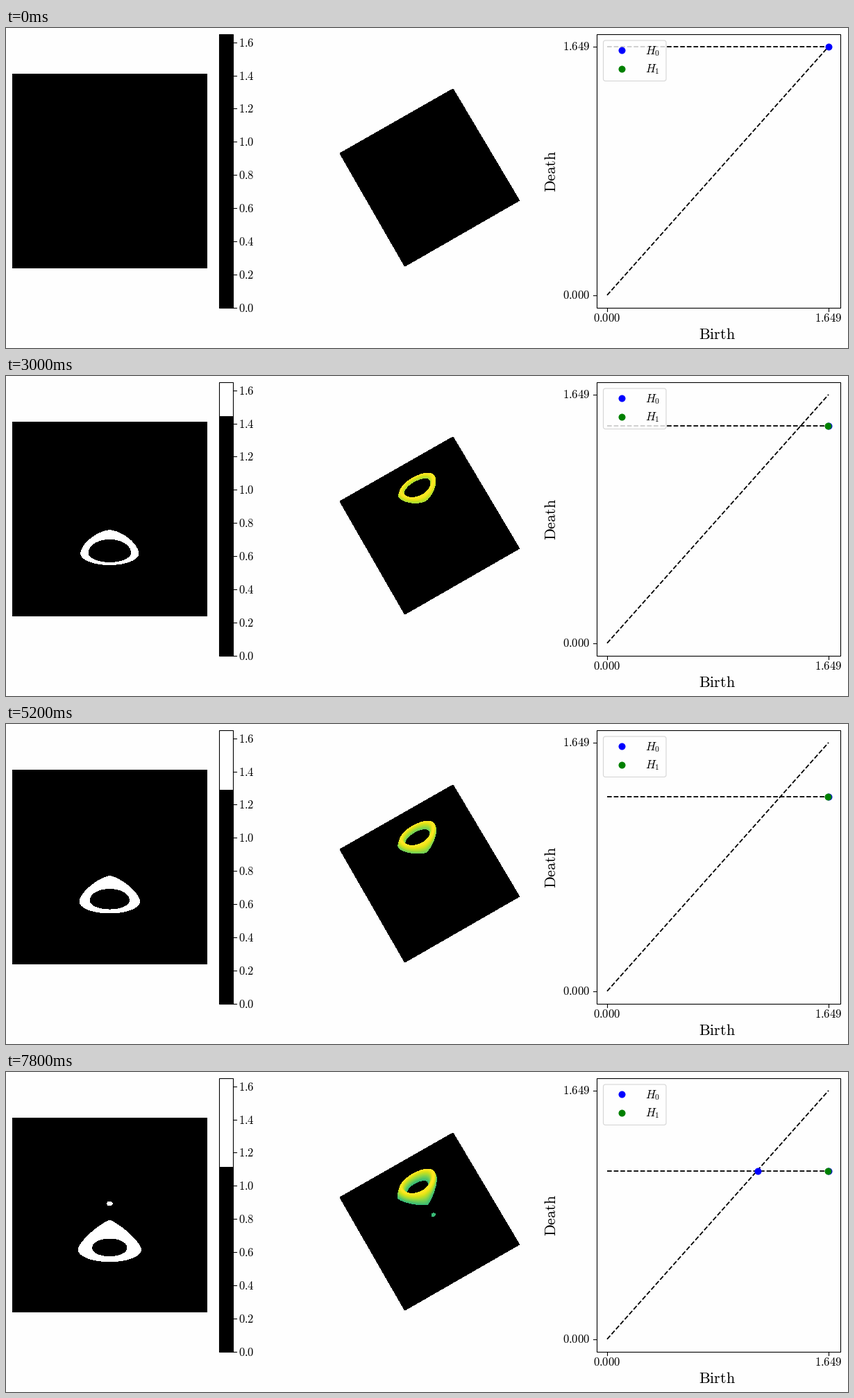
Recreate the animation shown at these times as a matplotlib script. Size 1213 px wide and 462 px high, loop 8000 ms.

```python
import numpy as np
import matplotlib.pyplot as plt
from matplotlib.animation import FuncAnimation
from matplotlib.patches import FancyBboxPatch, Polygon, Rectangle

W, H, DPI = 1213, 462, 100
FRAMES, STEPS = 40, 120
PEAK = 1.649          # highest value of the field
SPECK = 1.1217        # height of the second, smaller peak
PT = 72 / DPI

plt.rcParams["mathtext.fontset"] = "cm"
fig = plt.figure(figsize=(W / DPI, H / DPI), dpi=DPI, facecolor="#fefefe")
ax = fig.add_axes([0, 0, 1, 1])
ax.axis("off")

# Shape of the level curves, by signed offset from the ridge (inside > 0)
LEVEL = [-0.732, -0.6, -0.389, 0, 0.389, 0.6, 0.732]
HALF = [45.1, 43.2, 40.7, 36, 31, 28, 24.6]
TOP = [214, 219.5, 224.2, 230, 235.5, 238.6, 241]
BOTTOM = [273.7, 273, 272.2, 271, 269, 267, 265.6]
WAIST = [256, 256, 256, 256, 255.5, 254.5, 254]
POWER = [1.15, 1.35, 1.65, 1.9, 2, 2, 2]
ROUND = [0.72, 0.66, 0.6, 0.55, 0.52, 0.5, 0.5]
CX = 149.3
THETA = np.linspace(0, 2 * np.pi, 900)


def contour(c):
    """Points of the level curve (or curves) at offset c, in stage pixels."""
    half, top, bottom, waist, p, m = (
        np.interp(c, LEVEL, v) for v in (HALF, TOP, BOTTOM, WAIST, POWER, ROUND))
    cos, sin = np.cos(THETA), np.sin(THETA)
    rise = np.clip(1 - np.abs(cos) ** p, 0, 1) ** m
    y = np.where(sin > 0, waist - (waist - top) * rise,
                 waist - (bottom - waist) * sin)
    return CX + half * cos, y


def project(x, y, z):
    """Tilted 3D view of the left panel; also returns the depth order."""
    right, up = x - CX, 206.5 - y
    scale = 1 + 0.045 * z
    base = 0.573 * up + 0.331 * right
    px = 609.8 + scale * (0.338 * up - 0.58 * right)
    return px, 215.7 + scale * base - 17.5 * z, base


def text(x, y, s, size=12, **kw):
    ax.text(x, y, s, fontsize=size, color="black", **kw)


def line(xs, ys, width=0.8, **kw):
    return ax.plot(xs, ys, color="black", lw=width, **kw)[0]


def dot(x, y, color, z):
    return ax.plot([x], [y], "o", color=color, ms=10 * PT, mew=0, zorder=z)[0]


def box(x0, y0, x1, y1, **kw):
    return ax.add_patch(Rectangle((x0, y0), x1 - x0, y1 - y0, **kw))


# Left panel: thresholded image
box(9, 66, 290, 347, fc="black", lw=0, aa=False)
outer = ax.add_patch(Polygon([(0, 0)] * 3, fc="white", lw=0, aa=False, zorder=2))
inner = ax.add_patch(Polygon([(0, 0)] * 3, fc="black", lw=0, aa=False, zorder=3))
speck = ax.add_patch(Polygon(
    [(CX + dx, 190 + dy) for dx, dy in
     ((-4, 0), (-1.7, -3), (1.7, -3), (4, 0), (1.7, 3), (-1.7, 3))],
    fc="white", lw=0, aa=False, zorder=2))

# Colour bar
box(307, 9, 327, 404, fc="black", lw=0)
bar = box(307, 9, 327, 9, fc="white", lw=0, aa=False, zorder=2)
box(307, 9, 327, 404, fc="none", ec="black", lw=0.8, zorder=3)
for k in range(9):
    y = 404 - 239.6 * 0.2 * k
    line([327, 332], [y, y])
    text(335, y + 6, f"${0.2 * k:.1f}$")

# Middle panel: surface seen from above
ax.add_patch(Polygon([(481, 181), (644, 88), (739.5, 249), (574.5, 344)],
                     fc="black", lw=0, aa=False))
X0, X1, Y0, Y1 = 550, 640, 125, 220
surface = ax.imshow(np.zeros((Y1 - Y0, X1 - X0, 4)), extent=(X0, X1, Y1, Y0),
                    interpolation="nearest", aspect="auto", zorder=2)

# Right panel: persistence diagram
AX0, AX1, AY0, AY1 = 866, 1185, 385.7, 26.8


def birth_x(v):
    return AX0 + (AX1 - AX0) * v / PEAK


def death_y(v):
    return AY0 + (AY1 - AY0) * v / PEAK


box(851, 9, 1202, 404, fc="none", ec="black", lw=0.8, zorder=5)
for x, y, label in ((AX0, AY0, "$0.000$"), (AX1, AY1, "$1.649$")):
    line([x, x], [404, 409])
    line([846, 851], [y, y])
    text(x, 424.5, label, ha="center")
    text(841.5, y + 5.7, label, ha="right")
text(1024.5, 449, r"$\mathrm{Birth}$", 16, ha="center")
text(786, 207, r"$\mathrm{Death}$", 16, ha="center", va="center", rotation=90)
line([AX0, AX1], [AY0, AY1], 1.3, ls="--", zorder=2)
sweep = line([AX0, AX1], [AY1, AY1], 1.3, ls="--", zorder=2)
h0 = dot(AX1, AY1, "blue", 3)
h0_new = dot(birth_x(SPECK), AY1, "blue", 3)
h1 = dot(birth_x(1.646), AY1, "green", 4)

ax.add_patch(FancyBboxPatch(
    (860.5, 18), 90.5, 58.5, boxstyle="round,pad=0,rounding_size=3",
    fc="white", ec="#cccccc", lw=0.8, alpha=0.8, zorder=6))
for y, color, label in ((32, "blue", "$H_0$"), (58.5, "green", "$H_1$")):
    dot(887, y, color, 7)
    text(921, y + 6, label, zorder=7)

ax.set_xlim(0, W)
ax.set_ylim(H, 0)


def render(t, reach, with_speck):
    """Paint the part of the surface above t, far points first."""
    xs, ys, zs = [], [], []
    for c in np.linspace(-reach, reach, 70):
        x, y = contour(c)
        xs.append(x)
        ys.append(y)
        zs.append(np.full_like(x, PEAK - c * c))
    if with_speck:
        r, a = np.meshgrid(np.linspace(0, 1, 14), np.linspace(0, 2 * np.pi, 60))
        xs.append((CX + 3.8 * r * np.cos(a)).ravel())
        ys.append((190 + 3.3 * r * np.sin(a)).ravel())
        zs.append(np.full(r.size, t))
    z = np.concatenate(zs)
    px, py, depth = project(np.concatenate(xs), np.concatenate(ys), z)
    order = np.argsort(depth, kind="stable")
    img = np.zeros((Y1 - Y0, X1 - X0, 4))
    rows = (py[order] - Y0).astype(int)
    cols = (px[order] - X0).astype(int)
    img[rows, cols] = plt.cm.viridis(z[order] / PEAK)
    return img


def update(i):
    t = PEAK * (1 - i / STEPS)
    reach = np.sqrt(PEAK - t)
    started, split = i > 0, t < SPECK
    for art in (outer, inner, surface, h1, bar):
        art.set_visible(started)
    for art in (speck, h0_new):
        art.set_visible(split)
    if started:
        outer.set_xy(np.column_stack(contour(-reach)))
        inner.set_xy(np.column_stack(contour(reach)))
        surface.set_data(render(t, reach, split))
        bar.set_height(404 - 239.6 * t - 9)
    y = death_y(t)
    sweep.set_ydata([y, y])
    for art in (h0, h0_new, h1):
        art.set_ydata([y])
    return []


anim = FuncAnimation(fig, update, frames=FRAMES, interval=200,
                     repeat=True, repeat_delay=0, blit=False)
plt.show()
```
